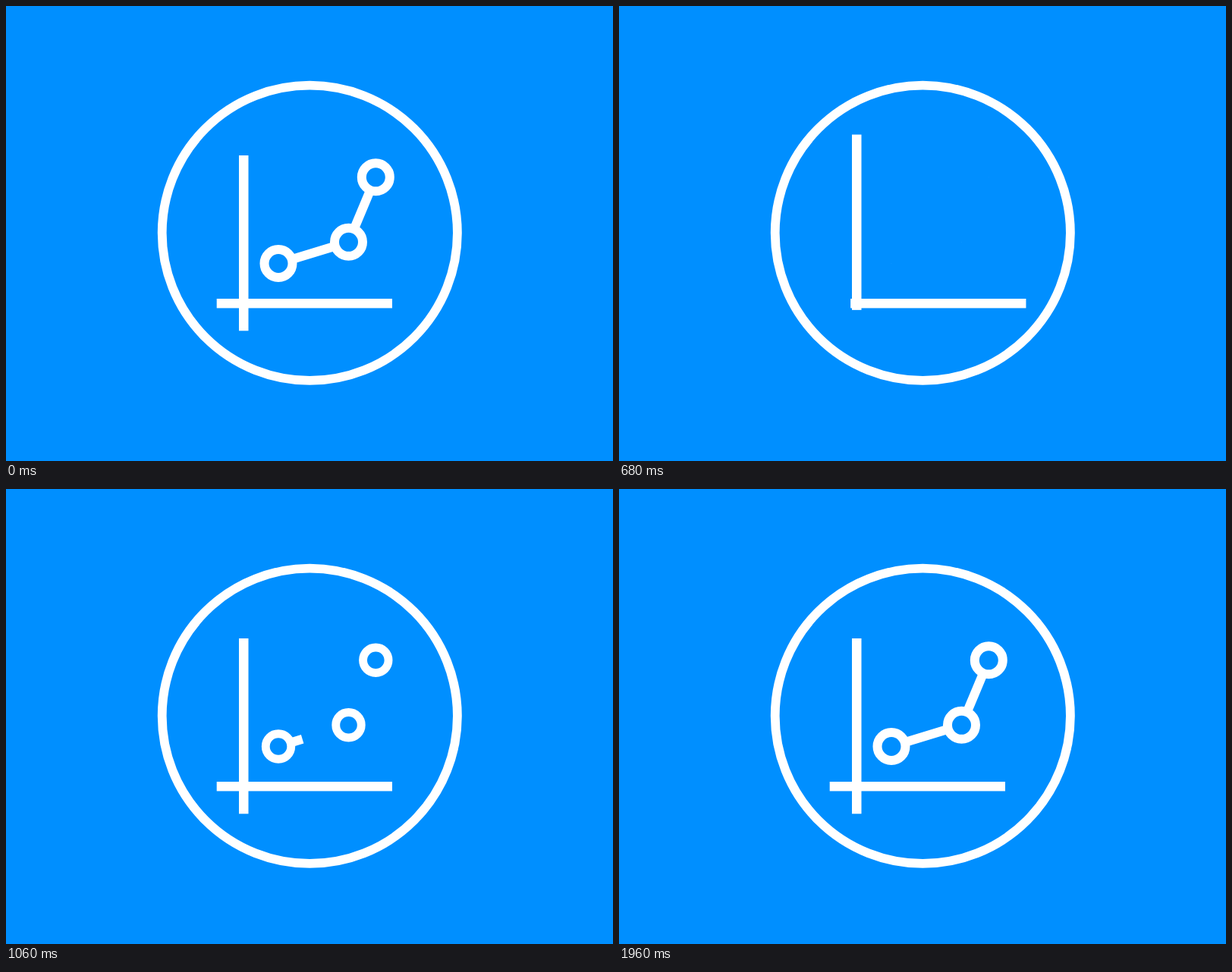
An HTML page that plays this animation: 800x600 px, repeating every 1.98 s.

```html
<!DOCTYPE html>
<html lang="en">
<head>
<meta charset="utf-8">
<title>Chart icon</title>
<style>
  html, body { margin: 0; width: 100%; height: 100%; overflow: hidden; background: #008fff; }
  svg { display: block; width: 100vw; height: 100vh; }
</style>
</head>
<body>
<svg viewBox="0 0 800 600">
  <defs>
    <clipPath id="disc"><circle cx="400.3" cy="299.3" r="195"/></clipPath>
  </defs>
  <rect width="800" height="600" fill="#008fff"/>
  <g clip-path="url(#disc)" fill="#fff">
    <rect id="vertical" x="307" y="197" width="12.5" height="231.3"/>
    <rect id="horizontal" x="277.7" y="386" width="231.3" height="12.4"/>
  </g>
  <path id="trend" fill="none" stroke="#fff" stroke-width="12"/>
  <g id="nodes" fill="#008fff" stroke="#fff" stroke-width="12"></g>
  <circle cx="400.3" cy="299.3" r="194.6" fill="none" stroke="#fff" stroke-width="11.8"/>
</svg>
<script>
const LOOP = 1980;
const STEP = 20;
const MOVE = 500;
const SLIDE = 400;
const START = { axes: 260, nodes: 655, trend: 927 };
const POINTS = [[359, 339.5], [451.5, 311.3], [487.3, 225.8]];

const byId = id => document.getElementById(id);
const vertical = byId('vertical');
const horizontal = byId('horizontal');
const trend = byId('trend');

const nodes = POINTS.map(() => {
  const node = document.createElementNS('http://www.w3.org/2000/svg', 'circle');
  node.setAttribute('r', 18.5);
  return byId('nodes').appendChild(node);
});

trend.setAttribute('d', 'M' + POINTS.join('L'));
const trendLength = trend.getTotalLength();

function progress(time, start) {
  const p = Math.min(1, Math.max(0, (time - start) / MOVE));
  return p * p * (3 - 2 * p);
}

function draw(elapsed) {
  const time = Math.floor((elapsed % LOOP) / STEP) * STEP;
  // The loop opens on the finished chart for one step, then cuts to the empty ring.
  const at = time === 0 ? LOOP : time;

  const offset = SLIDE * (1 - progress(at, START.axes));
  vertical.setAttribute('transform', `translate(0 ${-offset})`);
  horizontal.setAttribute('transform', `translate(${offset} 0)`);

  const scale = progress(at, START.nodes);
  nodes.forEach((node, i) => {
    const [x, y] = POINTS[i];
    node.setAttribute('transform', `translate(${x} ${y}) scale(${scale})`);
    node.style.display = scale > 0 ? '' : 'none';
  });

  const drawn = progress(at, START.trend);
  trend.style.display = drawn > 0 ? '' : 'none';
  trend.setAttribute('stroke-dasharray', `${drawn * trendLength} ${trendLength + 1}`);
}

const begin = performance.now();
function tick() {
  draw(performance.now() - begin);
  requestAnimationFrame(tick);
}
tick();
</script>
</body>
</html>
```
